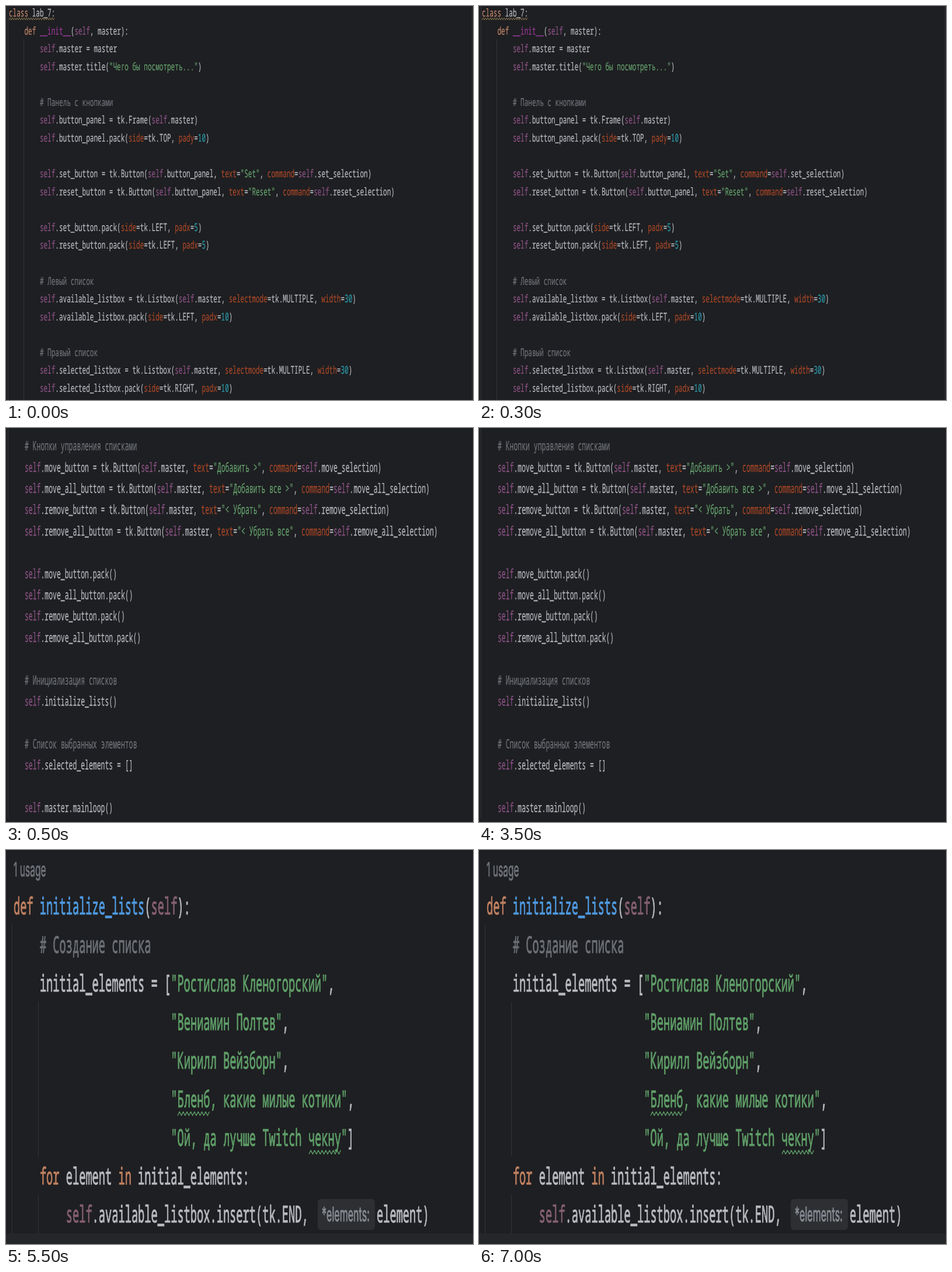
Recreate the animation shown at these times as an HTML page. Size 800 by 674 pixels, loop 8000 ms.

```html
<!DOCTYPE html>
<html lang="ru">
<head>
<meta charset="utf-8">
<style>
html, body { margin: 0; width: 100%; height: 100%; overflow: hidden; background: #1e1f22; }
svg { display: block; width: 100vw; height: 100vh; }
text {
  white-space: pre; color: #b8bac0; fill: currentColor; stroke: currentColor; stroke-width: .012em;
  text-rendering: geometricPrecision; font-family: "Noto Sans Mono", monospace;
}
tspan { fill: currentColor; stroke: currentColor; }
.soft text { stroke-width: .03em; }
.ui { font-family: Inter, sans-serif; color: #6f727a; }
.hint { color: #868a91; }
.self { color: #8c5285; }
.dunder { color: #98389a; }
.keyword { color: #c4866a; }
.string { color: #65a16d; }
.comment { color: #70747a; }
.number { color: #2a9aaa; }
.arg { color: #a84728; }
.name { color: #4f9ae0; }
.soft .self { color: #85606f; }
.soft .keyword { color: #c08060; }
.soft .string { color: #5f9f68; }
.soft .comment { color: #6c7076; }
.guide { stroke: #313438; }
.wave { fill: none; stroke-linejoin: round; }
</style>
</head>
<body>
<svg id="stage" viewBox="0 0 800 674" preserveAspectRatio="none"></svg>
<script>
const LOOP = 8000;
const ADVANCE = 0.6;

const scenes = [
  {
    start: 0, x: 5, y: 18, step: 30.57, cell: 6.612, size: 18.4,
    guides: [[3.5, 0, 674], [30.5, 57, 674], [798.5, 0, 674]],
    waves: [[5, 84, 22, 2, '#82714a']],
    code: `class lab_7:
    def __init__(self, master):
        self.master = master
        self.master.title("Чего бы посмотреть...")

        # Панель с кнопками
        self.button_panel = tk.Frame(self.master)
        self.button_panel.pack(side=tk.TOP, pady=10)

        self.set_button = tk.Button(self.button_panel, text="Set", command=self.set_selection)
        self.reset_button = tk.Button(self.button_panel, text="Reset", command=self.reset_selection)

        self.set_button.pack(side=tk.LEFT, padx=5)
        self.reset_button.pack(side=tk.LEFT, padx=5)

        # Левый список
        self.available_listbox = tk.Listbox(self.master, selectmode=tk.MULTIPLE, width=30)
        self.available_listbox.pack(side=tk.LEFT, padx=10)

        # Правый список
        self.selected_listbox = tk.Listbox(self.master, selectmode=tk.MULTIPLE, width=30)
        self.selected_listbox.pack(side=tk.RIGHT, padx=10)`
  },
  {
    start: 500, x: 32, y: 38.2, step: 36.41, cell: 6.87, size: 22,
    guides: [[3.5, 0, 668]],
    code: `# Кнопки управления списками
self.move_button = tk.Button(self.master, text="Добавить >", command=self.move_selection)
self.move_all_button = tk.Button(self.master, text="Добавить все >", command=self.move_all_selection)
self.remove_button = tk.Button(self.master, text="< Убрать", command=self.remove_selection)
self.remove_all_button = tk.Button(self.master, text="< Убрать все", command=self.remove_all_selection)

self.move_button.pack()
self.move_all_button.pack()
self.remove_button.pack()
self.remove_all_button.pack()

# Инициализация списков
self.initialize_lists()

# Список выбранных элементов
self.selected_elements = []

self.master.mainloop()`
  },
  {
    start: 5500, x: 13, y: 110.2, step: 65.9, cell: 11.22, size: 39.6, soft: true,
    guides: [[10.5, 128, 656], [55.5, 260, 524], [55.5, 590, 656]],
    waves: [[294, 351, 451, 3.2, '#5f9f68'], [519, 576, 517, 3.2, '#5f9f68']],
    code: `def initialize_lists(self):
    # Создание списка
    initial_elements = ["Ростислав Кленогорский",
                        "Вениамин Полтев",
                        "Кирилл Вейзборн",
                        "Бленб, какие милые котики",
                        "Ой, да лучше Twitch чекну"]
    for element in initial_elements:
        self.available_listbox.insert(tk.END,`,
    extra: s => `<rect y="656" width="800" height="18" fill="#25262a"/>
      <rect x="534" y="597" width="98" height="53" rx="6" fill="#2d2f33"/>
      ${label(s, 13, 45, '1 usage', 'ui', 33)}
      ${label(s, 541, 635, '*elements:', 'ui hint', 34)}
      ${label(s, 635, 637.4, 'element)')}`
  }
];

const TOKENS = new RegExp([
  '(?<comment>#.*)',
  '(?<string>"[^"]*")',
  '(?<dunder>__\\w+__)',
  '(?<name>(?<=def )\\w+)',
  '(?<keyword>\\b(?:class|def|for|in)\\b)',
  '(?<self>\\bself\\b)',
  '(?<arg>\\b\\w+(?==))',
  '(?<number>\\b\\d+\\b)'
].join('|'), 'g');

const escape = s => s.replace(/&/g, '&amp;').replace(/</g, '&lt;').replace(/>/g, '&gt;');

function highlight(line) {
  let out = '', last = 0;
  for (const m of line.matchAll(TOKENS)) {
    const kind = Object.keys(m.groups).find(k => m.groups[k] !== undefined);
    out += escape(line.slice(last, m.index)) + `<tspan class="${kind}">${escape(m[0])}</tspan>`;
    last = m.index + m[0].length;
  }
  return out + escape(line.slice(last));
}

// Each screen is squeezed horizontally by one common factor.
function label(s, x, y, content, cls = '', size = s.size) {
  const squeeze = s.cell / (s.size * ADVANCE);
  return `<text class="${cls}" font-size="${size}" transform="translate(${x} ${y}) scale(${squeeze} 1)">${content}</text>`;
}

function wave([x1, x2, y, h, color]) {
  let d = `M${x1} ${y + h}`;
  for (let x = x1 + h, up = true; x <= x2; x += h, up = !up) d += `L${x} ${up ? y - h : y + h}`;
  return `<path class="wave" d="${d}" stroke="${color}" stroke-width="${h > 3 ? 1.4 : 1}"/>`;
}

function draw(s) {
  const lines = s.code.split('\n').map((line, i) => {
    const text = line.trimStart();
    const indent = line.length - text.length;
    return text && label(s, s.x + indent * s.cell, s.y + i * s.step, highlight(text));
  });
  const guides = s.guides.map(([x, a, b]) => `<path class="guide" d="M${x} ${a}V${b}"/>`);
  const waves = (s.waves || []).map(wave);
  return `<g class="${s.soft ? 'soft' : ''}">${[...guides, ...lines, ...waves].join('')}${s.extra ? s.extra(s) : ''}</g>`;
}

const stage = document.getElementById('stage');
stage.innerHTML = '<rect width="800" height="674" fill="#1e1f22"/>' + scenes.map(draw).join('');
const groups = stage.querySelectorAll('g');
const origin = performance.now();

function update(now) {
  const t = Math.max(0, now - origin) % LOOP;
  const current = scenes.findLastIndex(s => t >= s.start);
  groups.forEach((g, i) => g.setAttribute('display', i === current ? 'inline' : 'none'));
}

function tick(now) {
  update(now);
  requestAnimationFrame(tick);
}

update(origin);
requestAnimationFrame(tick);
</script>
</body>
</html>
```
